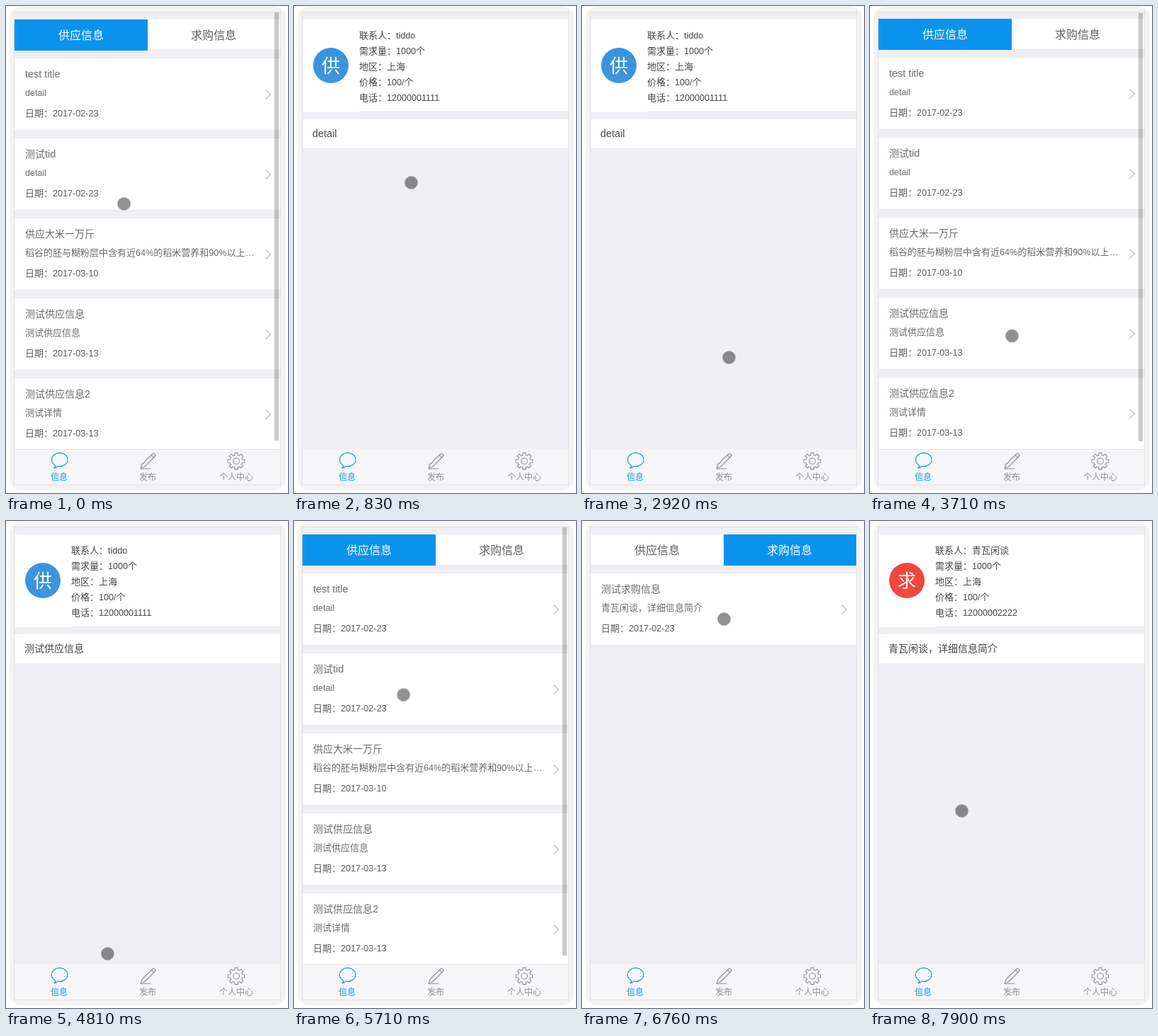
These frames come from a looping animation (398x688 px, 8000 ms). An HTML page:

```html
<!DOCTYPE html>
<html lang="zh-CN">
<head>
<meta charset="utf-8">
<title>供求信息</title>
<style>
  html, body { margin: 0; width: 100%; height: 100%; overflow: hidden; background: #fff; }
  svg { display: block; width: 398px; height: 688px; }
  text { font-family: "Liberation Sans", "Noto Sans CJK SC", "Noto Sans CJK", sans-serif; white-space: pre; }
  .mark { font-family: "Noto Sans CJK TC", "Noto Sans CJK SC", sans-serif; }
  .page { visibility: hidden; }
  .line { fill: none; stroke-width: 1.1; stroke-linejoin: round; stroke-linecap: round; }
</style>
</head>
<body>
<svg id="stage" viewBox="0 0 398 688"></svg>
<script>
const LOOP = 8000;
const BLUE = '#0a93ec', GREY = '#8f8f94', LABEL = '#6a6a6f', DARK = '#454548', RULE = '#e5e5e9';
const stage = document.getElementById('stage');

function add(parent, tag, attrs, content) {
  const el = document.createElementNS('http://www.w3.org/2000/svg', tag);
  for (const key in attrs) el.setAttribute(key, attrs[key]);
  if (content) el.textContent = content;
  return parent.appendChild(el);
}
const rect = (p, x, y, width, height, fill, rx = 0) => add(p, 'rect', { x, y, width, height, fill, rx });
const line = (p, d, stroke) => add(p, 'path', { d, stroke, class: 'line' });
const page = () => add(stage, 'g', { class: 'page' });

// Latin runs are sized so that a digit is a whole number of pixels wide;
// full-width punctuation is centred in its cell.
function text(p, x, y, size, fill, str, anchor = 'start') {
  const el = add(p, 'text', { x, y, 'font-size': size, fill, 'text-anchor': anchor });
  for (const run of str.match(/[：，]|[ -~]+|[^ -~：，]+/g)) {
    const attrs = {};
    if (/[：，]/.test(run)) attrs.class = 'mark';
    else if (/[ -~]/.test(run)) attrs['font-size'] = (Math.round(size * .556) / .556).toFixed(2);
    add(el, 'tspan', attrs, run);
  }
}

function card(p, y, [title, detail, date]) {
  rect(p, 12, y, 375, 103, '#eaeaee');
  rect(p, 12, y + 1, 375, 101, '#fff');
  text(p, 27, y + 28, 14, LABEL, title);
  text(p, 27, y + 54, 13, LABEL, detail);
  text(p, 27, y + 83, 13, '#5c5c62', '日期：' + date);
  add(p, 'path', {
    d: `M366.5 ${y + 45.5}l7 6.5l-7 6.5`, fill: 'none', stroke: '#c7c7cc', 'stroke-width': 1.6
  });
}

function listPage(active, cards) {
  const p = page(), body = add(p, 'g', {});
  rect(body, 12, 19, 375, 43, '#fff');
  rect(body, 12, 62, 375, 1, RULE);
  rect(body, active ? 200 : 12, 19, active ? 187 : 188, 44, BLUE);
  ['供应信息', '求购信息'].forEach((name, i) =>
    text(body, i ? 293 : 106, 47, 16, i === active ? '#fff' : '#5f5f64', name, 'middle'));
  cards.forEach((c, i) => card(body, 73 + 113 * i, c));
  return { p, body };
}

function detailPage(badge, color, person, phone, note) {
  const p = page();
  rect(p, 12, 19, 375, 131, '#fff');
  rect(p, 92, 149, 295, 1, RULE);
  rect(p, 12, 160, 375, 41, '#fff');
  add(p, 'circle', { cx: 52, cy: 84, r: 25, fill: color });
  text(p, 52, 93.5, 26, '#fff', badge, 'middle');
  ['联系人：' + person, '需求量：1000个', '地区：上海', '价格：100/个', '电话：' + phone]
    .forEach((row, i) => text(p, 92, 46 + 22 * i, 13, DARK, row));
  text(p, 26, 185, 14, DARK, note);
  return { p };
}

function gear(cx, cy) {
  const pts = [];
  for (let i = 0; i < 8; i++) {
    for (const [da, r] of [[-.25, 9], [-.17, 12], [.17, 12], [.25, 9]]) {
      const a = i * Math.PI / 4 + da;
      pts.push((cx + r * Math.sin(a)).toFixed(2) + ' ' + (cy - r * Math.cos(a)).toFixed(2));
    }
  }
  return 'M' + pts.join('L') + 'Z';
}

function tabBar() {
  rect(stage, 12, 626, 375, 50, '#f6f6f9');
  line(stage, 'M68 653Q70.5 651 69.3 648.8A11.3 9.5 0 1 1 73 650.2Q71 652.5 68 653Z', BLUE);
  line(stage, 'M190 653L192 647.5L207 632.5Q208 631.5 209 632.5L210.5 634Q211.5 635 210.5 636L195.5 651Z' +
    'M205 634.5l3.7 3.7M190 653.7H204', GREY);
  line(stage, gear(325, 643), GREY);
  add(stage, 'circle', { cx: 325, cy: 643, r: 4.3, class: 'line', stroke: GREY });
  ['信息', '发布', '个人中心'].forEach((name, i) =>
    text(stage, 75 + 125 * i, 669.5, 12, i ? GREY : BLUE, name, 'middle'));
}

// Each step [time, value] holds until the next one.
function play(el, prop, steps, css = v => v) {
  const frames = steps.map(([t, ...v]) =>
    ({ offset: Math.max(0, t) / LOOP, [prop]: css(...v), easing: 'steps(1, end)' }));
  frames.push({ offset: 1, [prop]: frames[frames.length - 1][prop] });
  el.animate(frames, { duration: LOOP, iterations: Infinity });
}
const move = (x, y) => `translate(${x}px, ${y}px)`;

// Expands key points [x, y, from, to] into eased steps about 125 ms apart.
function glide(x0, y0, moves) {
  const steps = [[0, x0, y0]];
  for (const [x, y, from, to = from] of moves) {
    const n = Math.round((to - from) / 125) + 1;
    for (let k = 1; k <= n; k++) {
      const e = 1 - (1 - k / n) ** 2;
      steps.push([n > 1 ? from + (to - from) * (k - 1) / (n - 1) : from, x0 + (x - x0) * e, y0 + (y - y0) * e]);
    }
    [x0, y0] = [x, y];
  }
  return steps;
}

rect(stage, 5, 1, 390, 683, '#f3f3f3', 16);
rect(stage, 11, 8, 377, 669, '#e1e1e4');
rect(stage, 12, 9, 375, 667, '#eeeef3');

const supply = listPage(0, [
  ['test title', 'detail', '2017-02-23'],
  ['测试tid', 'detail', '2017-02-23'],
  ['供应大米一万斤', '稻谷的胚与糊粉层中含有近64%的稻米营养和90%以上…', '2017-03-10'],
  ['测试供应信息', '测试供应信息', '2017-03-13'],
  ['测试供应信息2', '测试详情', '2017-03-13']
]);
const bar = rect(supply.p, 379, 9, 6, 605, 'rgba(0, 0, 0, .21)');
const wanted = listPage(1, [['测试求购信息', '青瓦闲谈，详细信息简介', '2017-02-23']]);
const offer = ['供', '#3b94df', 'tiddo', '12000001111'];
const first = detailPage(...offer, 'detail');
const second = detailPage(...offer, '测试供应信息');
const request = detailPage('求', '#f0483c', '青瓦闲谈', '12000002222', '青瓦闲谈，详细信息简介');

tabBar();
const edge = page();
rect(edge, 12, 626, 375, 1, RULE);

const dot = add(stage, 'g', {});
add(dot, 'circle', { r: 10.6, fill: '#fff', 'fill-opacity': .6 });
const disc = add(dot, 'circle', { r: 9.3 });

const scenes = [[0, supply], [830, first], [3050, supply], [4230, second],
  [5590, supply], [6490, wanted], [7320, request]];
const during = (el, prop, test, on, off) =>
  play(el, prop, scenes.map(([t, s]) => [t, test(s) ? on : off]));

for (const s of [supply, wanted, first, second, request])
  during(s.p, 'visibility', v => v === s, 'visible', 'hidden');
during(edge, 'visibility', s => s === supply, 'visible', 'hidden');
during(disc, 'fill', s => s.body, '#919194', '#878788');

// The scrollbar fades after each opening; a touch brings it back and nudges the list by a pixel.
const visits = [[-300, 300], [3050, 3710], [5590, 6370]];
const nudge = visits.flatMap(([open, touch]) => [[open, 0], [touch, 1]]);
play(supply.body, 'transform', nudge, n => move(0, -n));
play(bar, 'transform', nudge, n => move(0, n));
play(bar, 'opacity', visits.flatMap(([open, touch]) =>
  [[open, 1], [open + 300, .47], [open + 420, 0], [touch, 1]]));

play(dot, 'transform', glide(166.5, 279.5, [
  [165.5, 249.5, 150], [144.5, 253.5, 1260], [92.5, 160.5, 1410], [96.5, 563.5, 1535, 1660],
  [77.5, 679, 1810, 1940], [79.5, 656, 2090], [207.5, 496.5, 2650, 2920], [200.5, 466, 3050, 3590],
  [202.5, 541.5, 4660], [96, 667, 4810, 5050], [85.5, 656.5, 5170], [159.5, 492.5, 5320, 5440],
  [154.5, 245.5, 5590, 5710], [265.5, 45.5, 5840, 6220], [265.5, 50.5, 6370],
  [200.5, 138.5, 6640, 6760], [129.5, 409.5, 7900]
]), move);
</script>
</body>
</html>
```
